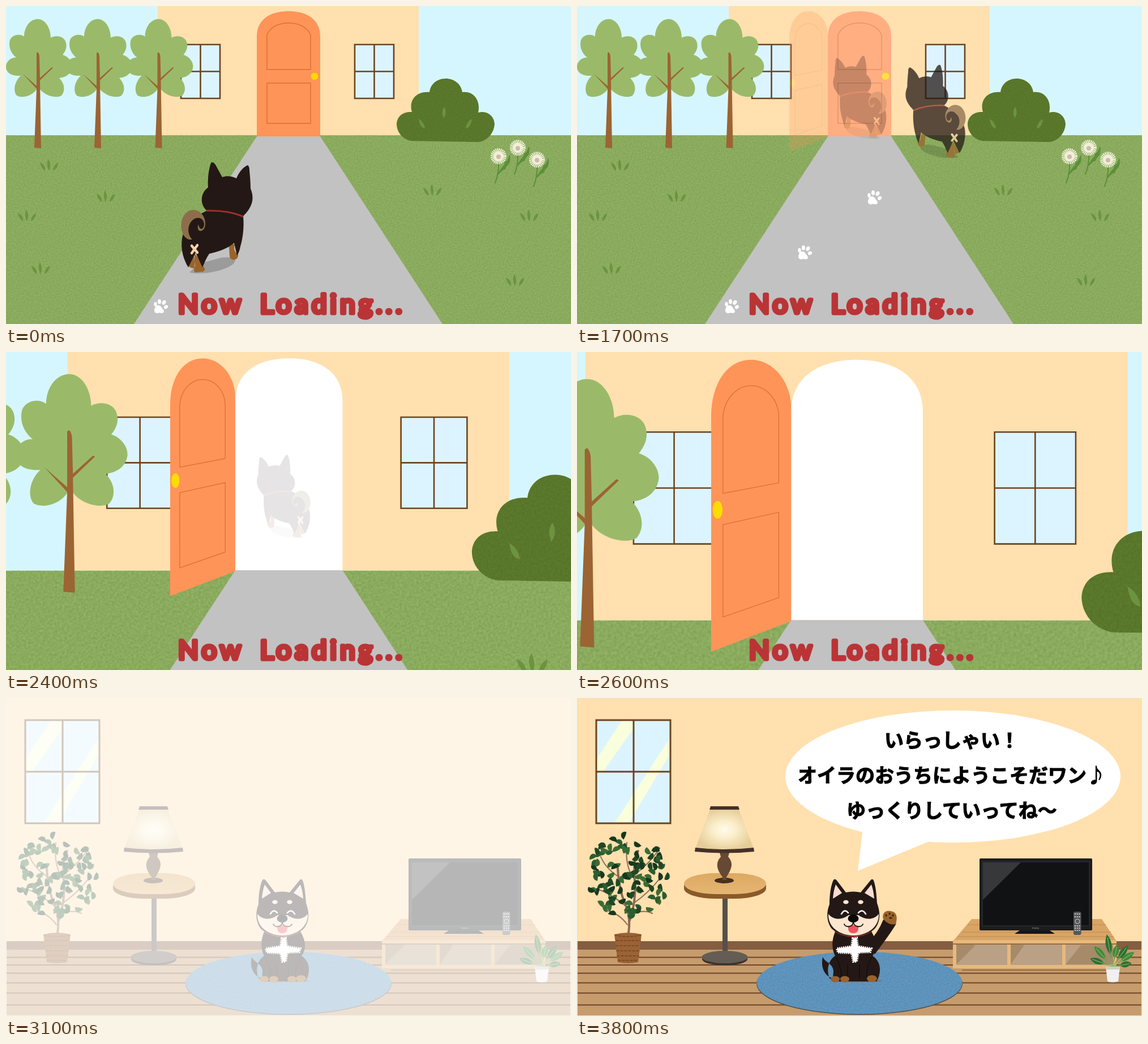
These frames come from a looping animation (998x561 px, 6.8 s). An HTML page:

```html
<!DOCTYPE html>
<html lang="ja">
<head>
<meta charset="utf-8">
<title>Now Loading</title>
<style>
html, body { margin: 0; width: 100%; height: 100%; overflow: hidden; background: #fff; }
svg { display: block; width: 100vw; height: 100vh; }
.loading { font: 400 47px Lato, sans-serif; letter-spacing: 6.3px; word-spacing: 10px;
  fill: #ba3436; stroke: #ba3436; stroke-width: 7; stroke-linejoin: round; }
.speech { font: 900 34px "Noto Sans CJK JP", "Noto Sans CJK", sans-serif; text-anchor: middle;
  stroke: #000; stroke-width: 1.2; stroke-linejoin: round; }
.line { fill: none; stroke-linecap: round; stroke-linejoin: round; }
.thin { vector-effect: non-scaling-stroke; }
</style>
</head>
<body>
<svg viewBox="0 0 998 561" preserveAspectRatio="none">
<defs>
  <filter id="grain" x="0" y="0" width="1" height="1" color-interpolation-filters="sRGB">
    <feTurbulence type="fractalNoise" baseFrequency=".4" numOctaves="2"/>
    <feColorMatrix values="0 0 0 0 .2  0 0 0 0 .25  0 0 0 0 .05  .3 0 0 0 -.08"/>
    <feComposite operator="atop" in2="SourceGraphic"/>
  </filter>
  <radialGradient id="glow"><stop stop-color="#fffbea"/><stop offset=".4" stop-color="#fbeecb"/><stop offset="1" stop-color="#e6cd97"/></radialGradient>
  <linearGradient id="wood" x2="0" y2="1"><stop stop-color="#dda963"/><stop offset="1" stop-color="#e5b673"/></linearGradient>

  <g id="tree">
    <path fill="#9aba6a" d="M32,54C32,38 42,23 56,23C70,23 79,40 79,56C88,51 101,53 105,62C109,72 105,80 100,86C110,89 117,98 117,107C116,119 106,126 94,127C104,137 105,150 98,158C88,164 65,158 57,142C50,158 30,164 19,158C12,150 15,133 26,123C12,124 0,119 0,107C0,97 10,90 18,91C8,83 4,71 7,60C12,49 26,49 32,54Z"/>
    <path fill="#9c6433" d="M54,83Q57,79 59,88L60,127L81,108L83,109L60,131L62,251L50,250L54,146L30,120L54,141Z"/>
  </g>
  <path id="pane" class="thin" fill="#dcf4ff" stroke="#6b4420" stroke-width="2.600" d="M1,1H70V96H1ZM35.500,1V96M1,48.500H70"/>
  <path id="tuft" fill="#6b9340" d="M0,10Q-6,-2-1,-11Q5,0 0,10M-7,10Q-15,4-16,-5Q-5,0-7,10M7,10Q7,0 16,-5Q16,5 7,10"/>
  <g id="flower">
    <path class="line" stroke="#5b9038" stroke-width="2" d="M0,10Q1,30-6,47"/>
    <path fill="#5b9038" d="M-4,36Q3,22 10,15L11,10L15,8L20,-3Q23,12 14,18L12,23L7,25Z"/>
    <circle r="9" fill="#ebe8cc"/>
    <circle r="8" fill="none" stroke="#f5f3e0" stroke-width="12" stroke-dasharray="1.3 .8"/>
    <circle r="4" cy="1" fill="#cdbba6"/>
  </g>
  <g id="paw" fill="#fff">
    <path d="M-4,-2C1,-2 2,3 5,6C8,11 3,13-2,11C-6,13-12,12-11,6C-10,1-8,-2-4,-2Z"/>
    <ellipse cx="-9" cy="-4" rx="2.700" ry="4"/>
    <ellipse cx="-2" cy="-8.500" rx="3" ry="4.300"/>
    <ellipse cx="6" cy="-7" rx="3.200" ry="4.300" transform="rotate(30 6 -7)"/>
    <ellipse cx="9.500" cy="1" rx="3" ry="3.800" transform="rotate(55 9.500 1)"/>
  </g>
  <path id="arch" d="M443,230V53C443,25 465,9 499,9C533,9 555,25 555,53V230Z"/>

  <g id="walker">
    <path fill="#000" opacity=".2" d="M324,470C345,475 385,468 400,456C412,446 400,441 380,444L340,455Z"/>
    <path fill="#9a6329" d="M331,434Q322,447 321,456Q325,464 333,462L333,437C342,445 345,456 350,461C353,466 350,469 344,469L334,470C331,467 332,463 334,459ZM393,420H404C402,428 403,434 410,438C411,443 408,447 402,448L397,446C393,440 396,432 393,422Z"/>
    <path fill="#231815" d="M357,320C356,303 358,288 362,277C364,274 368,277 370,280L382,302C390,299 399,300 407,304C412,292 419,285 426,281C429,281 430,285 430,290C431,300 432,312 432,322C437,334 437,346 430,357C426,364 422,367 419,371C421,390 418,412 414,424C413,430 411,436 408,440L403,418C390,429 373,434 359,437C354,444 351,452 347,461L335,435L322,461C314,448 308,430 311,410C315,390 330,372 355,361C343,352 342,331 357,320Z"/>
    <path class="line" stroke="#9c2f2c" stroke-width="3" d="M355,361Q392,360 418,371"/>
    <path fill="#8c6e4c" d="M323,412C305,405 305,372 322,362C339,354 353,370 352,385C352,392 348,397 343,397C338,396 338,389 340,385C341,396 350,396 350,384C348,371 335,372 329,378C321,386 319,401 329,412Z"/>
    <path class="line" stroke="#ffd2a4" stroke-width="4.500" d="M328,423L338,435M338,422L328,436"/>
  </g>
</defs>

<g id="outside">
  <g id="scene">
    <path fill="#d6f6ff" d="M0,0H998V229H0Z"/>
    <path fill="#ffe0ae" d="M268,0H729V228H268Z"/>
    <path fill="#91b364" filter="url(#grain)" d="M0,228H998V561H0Z"/>
    <use href="#pane" x="308" y="67"/><use href="#pane" x="615" y="67"/>
    <use href="#tree"/><use href="#tree" x="106"/><use href="#tree" x="213.500"/>
    <path fill="#5c7b2d" filter="url(#grain)" d="M716,238C700,235 690,222 690,208C691,193 703,186 717,187C711,167 724,150 748,152C750,136 763,128 777,128C791,128 804,137 806,152C826,149 839,167 834,188C850,184 862,194 863,208C862,226 848,239 834,240Z"/>
    <path fill="#6d9340" d="M773,198Q768,186 774,178Q780,188 773,198M729,199q10,6 11,17q-9,-1-11,-17M823,199q-10,6-11,17q9,-1 11,-17"/>
    <g id="tufts"></g>
    <use href="#flower" x="870" y="265"/><use href="#flower" x="904" y="250"/><use href="#flower" x="938" y="271"/>
    <g id="entrance">
      <path fill="#c2c2c2" d="M443,230H555L777.500,571H219.500Z"/>
      <use href="#arch" fill="#fff"/>
      <g id="shut">
        <use href="#arch" fill="#ff9459"/>
        <path fill="none" stroke="#d9722f" stroke-width="1.500" d="M461,112V51C466,38 480,30 499,30C518,30 533,38 538,51V112ZM461,136H538V207H461Z"/>
        <circle cx="545" cy="124" r="6.800" fill="#ffd60a" stroke="#e9a520" stroke-width=".8"/>
      </g>
      <g id="ajar">
        <path fill="#ff9459" d="M443,231V50C443,28 428,9 409,9C388,9 375,30 375,57V257Z"/>
        <path class="thin" fill="none" stroke="#d9722f" stroke-width="1.300" d="M385,122.500V58C386,42 397,31 409,31C421,31 432,42 432.500,57V113.500ZM385,149L432.500,138.500V211L385,227.500Z"/>
        <ellipse cx="380.500" cy="136.500" rx="4.200" ry="7.600" fill="#ffdc00"/>
      </g>
    </g>
    <g id="trail">
      <use href="#paw" x="273" y="530"/>
      <use id="paw1" href="#paw" x="402" y="435"/>
      <use id="paw2" href="#paw" x="525" y="338"/>
    </g>
  </g>
  <use id="dogA" href="#walker"/><use id="dogB" href="#walker"/>
  <text class="loading" x="304" y="541.500">Now Loading...</text>
  <rect id="edge" x=".5" y=".5" width="997" height="560" fill="none" stroke="#000"/>
</g>

<g id="room">
  <path fill="#ffe0ae" d="M0,0H998V430H0Z"/>
  <path fill="#855d40" d="M0,429H998V445H0Z"/>
  <path fill="#c69c6d" d="M0,444H998V561H0Z"/>
  <path stroke="#6f4526" stroke-width="1.800" d="M0,457.500H998M0,471H998M0,485.500H998M0,502.500H998M0,520.500H998M0,541.500H998"/>
  <rect x=".5" y=".5" width="997" height="560" fill="none" stroke="#f3e2d0"/>
  <path fill="#dcf4ff" d="M34,39H165V221H34Z"/>
  <path fill="#f9ffdc" d="M34,108L80,39H99V55L46,130H34ZM66,221L165,69V98L91,221Z"/>
  <path fill="none" stroke="#6b4420" stroke-width="3" d="M34,39H165V221H34ZM100,39V221M34,130H165"/>

  <g class="line" stroke="#8d6a55" stroke-width="4">
    <path d="M90,420Q96,390 86,365Q74,340 72,300M92,395Q105,360 102,320T108,270"/>
    <path stroke-width="2" d="M89,400Q75,380 50,374M87,368Q60,345 38,338M100,362Q125,345 145,320M96,382Q118,372 133,380M102,320Q84,300 88,255M104,310Q130,290 146,265M73,315Q50,300 42,280"/>
  </g>
  <g id="leaves"></g>
  <path fill="#9a6236" d="M66,417Q90,411 114,417L108,466Q90,470 72,466Z"/>
  <path class="line" stroke="#75441f" stroke-width="1.500" stroke-dasharray="4 3" d="M67,418Q90,424 113,418M69,428H112M69,437H111M70,446H110M71,455H109M73,463H108"/>

  <path fill="#56504a" d="M257,350H266V455H257Z"/>
  <path fill="#3b342e" d="M221,456H301V461C298,475 224,475 221,461Z"/>
  <ellipse cx="261" cy="457" rx="40.500" ry="11" fill="#655d54"/>
  <rect x="189" y="314" width="145" height="40" rx="56" ry="18" fill="#895a2a"/>
  <rect x="189" y="309" width="145" height="37" rx="56" ry="18.500" fill="url(#wood)"/>
  <ellipse cx="260" cy="322" rx="17" ry="5" fill="#49301f"/>
  <path fill="#664833" d="M252,273H269L267,280C278,292 272,303 264,316V321H257V316C248,304 243,292 254,280Z"/>
  <path fill="url(#glow)" d="M236,195H285L313,268Q260,272 208,268Z"/>
  <path fill="#46302a" d="M236,191H285L287,197H234ZM209,264Q260,270 312,264L313,271Q260,276 208,271Z"/>

  <path fill="#d9a566" d="M697,390H927L953,429H664Z"/>
  <path stroke="#c18a4c" d="M690,400H934M680,413H943M672,421H948"/>
  <path fill="#baa085" d="M667,432H950V474H667Z"/>
  <path fill="#a68a6a" d="M670,432L704,436L670,470ZM766,432L790,436L766,470ZM863,470L890,436H950V470Z"/>
  <path fill="none" stroke="#e6ba7d" stroke-width="6" d="M664,430H953M667,430V476M763,430V474M860,430V474M950,430V474M664,474H953"/>
  <path stroke="#9c6b38" stroke-width="2" d="M680,480H945M664,434H953"/>
  <path fill="#15161a" d="M785,408H832L844,416H773Z"/>
  <rect x="711" y="283" width="199" height="127" rx="2" fill="#1c1d1d"/>
  <path fill="#111214" stroke="#343536" d="M716,289H905V402H716Z"/>
  <path fill="#37383a" d="M717,290H784L717,356Z"/>
  <text x="810" y="407" font-family="Arial, sans-serif" font-size="4" fill="#999" text-anchor="middle">display</text>
  <rect x="877" y="377" width="13.500" height="41" rx="3" fill="#55585a"/>
  <path stroke="#d3d3d3" stroke-width="2" stroke-dasharray="2 1.700" d="M879,381H890M879,386H890M879,402H890M879,406H890M879,410H890"/>
  <circle cx="884" cy="394" r="4" fill="none" stroke="#ccc"/>
  <g id="fronds"></g>
  <path fill="#f1f0ee" d="M934,474H959L956,500Q946,503 937,500Z"/>
  <path fill="#cfccc8" d="M934,474H959L958,479H935Z"/>

  <ellipse cx="499" cy="504" rx="182" ry="55" fill="#54504c"/>
  <ellipse cx="499" cy="502.500" rx="181.500" ry="55" fill="#6199c8" filter="url(#grain)"/>

  <ellipse cx="496" cy="499" rx="44" ry="3" fill="#6b7d8c"/>
  <g fill="#231815">
    <path id="arm" d="M514,432Q532,414 541,391L564,398Q552,418 526,452Z"/>
    <path d="M434,457C438,466 453,469 453,482L452,495C437,490 430,476 434,457ZM457,410C448,430 451,445 456,455C444,462 440,480 446,494L452,500H529C538,485 538,465 522,455C530,445 531,430 520,412Z"/>
  </g>
  <path class="line" stroke="#0e0806" d="M456,456Q466,468 467,492M478,470V495M499,470V495M522,456Q512,468 511,492"/>
  <g fill="#9a6329">
    <ellipse cx="456" cy="496" rx="8" ry="5.500"/><ellipse cx="473" cy="496" rx="8" ry="5.500"/>
    <ellipse id="restPaw" cx="505" cy="496" rx="8" ry="5.500"/><ellipse cx="521" cy="495" rx="9" ry="6"/>
    <g id="wavePaw">
      <path d="M541,390C538,380 545,374 554,376C564,377 567,385 563,399Q551,402 541,390Z"/>
      <path class="line" stroke="#3b2313" stroke-width="3" d="M546,383v1M552,380v1M558,383v1M553,388h2"/>
    </g>
  </g>
  <path fill="#fff" stroke="#fff" stroke-width="4" stroke-dasharray="2 1.500" d="M487,424L494,423L496,438L520,442L518,448L497,449L494,465L488,465L485,450L461,449L459,442L485,438Z"/>
  <path class="line" stroke="#b5302f" stroke-width="4" d="M457,411Q488,428 519,411"/>
  <path fill="#231815" d="M446,364C446,345 449,329 453,321Q456,318 459,322L475,343Q488,340 501,343L519,321Q522,318 524,322C528,333 529,348 530,362C537,380 535,397 526,407C508,424 468,424 450,407C441,396 440,378 446,364Z"/>
  <path fill="#fbdcd0" d="M452,354Q453,340 457,329L468,344ZM525,354Q524,340 520,329L508,344Z"/>
  <path fill="#fde6d0" d="M444,381C455,394 470,390 480,383H497C507,390 522,394 533,381C534,405 512,419 488,419C465,419 443,405 444,381Z"/>
  <ellipse cx="475" cy="360" rx="4.800" ry="3.500" fill="#fde6d0"/><ellipse cx="501" cy="360" rx="4.800" ry="3.500" fill="#fde6d0"/>
  <path class="line" stroke="#fff" stroke-width="2.500" d="M467,381Q473,371 479,379M497,379Q504,371 510,381"/>
  <path fill="#ee5560" d="M479,403Q488,399 497,403Q498,415 488,415Q478,415 479,403Z"/>
  <path class="line" stroke="#231815" stroke-width="2" d="M472,399Q474,404 481,403Q488,402 488,394Q489,403 496,403Q503,404 505,399"/>
  <ellipse cx="488" cy="389" rx="9.500" ry="7" fill="#0b0706"/>

  <g id="bubble">
    <ellipse cx="664" cy="138.500" rx="296" ry="116.500" fill="#fff"/>
    <path fill="#fff" d="M506,222L496,305L622,253Z"/>
    <g class="speech">
      <text x="662" y="87">いらっしゃい！</text>
      <text x="662" y="149">オイラのおうちにようこそだワン♪</text>
      <text x="662" y="211">ゆっくりしていってね〜</text>
    </g>
  </g>
</g>
</svg>
<script>
const $ = id => document.getElementById(id);
const LOOP = 6800;

// Value in force at time t: pick(t, initial, time, value, time, value, ...)
function pick(t, value, ...steps) {
  for (let i = 0; i < steps.length && t >= steps[i]; i += 2) value = steps[i + 1];
  return value;
}
function fade(id, opacity) {
  $(id).style.display = opacity > 0 ? "" : "none";
  $(id).setAttribute("opacity", opacity);
}
// Puts the walking dog with its top left corner at x, y
function place(id, [x, y, s, flip]) {
  const dx = flip ? x + 436 * s : x - 308 * s;
  $(id).setAttribute("transform", `translate(${dx} ${y - 276 * s}) scale(${flip ? -s : s} ${s})`);
}

let seed = 7;
const random = () => (seed = seed * 16807 % 2147483647) / 2147483647;

$("tufts").innerHTML = [[76, 281], [176, 336], [37, 370], [61, 463], [753, 325], [924, 370], [899, 484]]
  .map(([x, y]) => `<use href="#tuft" x="${x}" y="${y}"/>`).join("");

const greens = ["#1f4726", "#2c5c30", "#3b6b35", "#17381f"];
$("leaves").innerHTML = Array.from({ length: 110 }, (_, i) => {
  const a = random() * 2 * Math.PI, r = Math.sqrt(random());
  const x = 89 + 72 * r * Math.cos(a), y = 314 + 73 * r * Math.sin(a);
  return `<path fill="${greens[i % 4]}" d="M-7,0Q-4,-7 3,-6Q8,-3 7,2Q0,3-7,0Z" transform="translate(${x} ${y}) rotate(${random() * 360})"/>`;
}).join("");

$("fronds").innerHTML = [[-70, 42], [-42, 48], [-10, 58], [12, 40], [36, 46], [56, 46], [80, 34]]
  .map(([angle, n], i) => `<g transform="translate(946 474) rotate(${angle})">
    <path fill="${i % 2 ? "#3f8a3a" : "#2c6f31"}" d="M0,0L-1,${-n * .4}Q-10,${-n * .7} 0,${-n}Q10,${-n * .7} 1,${-n * .4}Z"/>
    <path stroke="#8fbd67" d="M0,0V${-n * .9}"/></g>`).join("");

function render(t) {
  fade("outside", pick(t, 1, 2800, .3, 3000, 0));
  fade("room", pick(t, 0, 3000, .1, 3100, .3, 3300, 1));
  fade("edge", pick(t, 0, 2800, 1));

  const zoom = pick(t, 0, 2200, .25, 2400, .578, 2600, .9, 2800, 1);
  const pan = pick(t, 0, 2200, -149, 2400, -344.5, 2600, -542, 2800, -605);
  $("scene").setAttribute("transform", `translate(${pan} 0) scale(${1 + 1.197 * zoom})`);
  $("entrance").setAttribute("transform", `translate(0 ${-2.4 * Math.min(1, zoom * 2)})`);

  const open = t < 1700 ? 0 : Math.min(1, (Math.floor((t - 1700) / 100) + 1) / 4);
  fade("shut", 1 - open);
  fade("ajar", open);

  place("dogA", pick(t, [308, 276, 1], 500, [442, 191, .9, true], 1000, [566, 121, .8], 1500, [580, 104, .84, true]));
  fade("dogA", 1 - open);
  place("dogB", [452 - 16 * zoom, 88 + 162 * zoom, .75, true]);
  fade("dogB", open * pick(t, 1, 2200, .55, 2400, .11, 2600, 0));
  fade("paw1", pick(t, 0, 500, 1));
  fade("paw2", pick(t, 0, 1000, 1));
  fade("trail", pick(t, 1, 2200, .55, 2400, 0));

  const greeting = pick(t, 0, 3800, 1);
  for (const id of ["arm", "wavePaw", "bubble"]) fade(id, greeting);
  fade("restPaw", 1 - greeting);
}

let shown = -1;
function tick() {
  const step = Math.floor(performance.now() % LOOP / 100);
  if (step !== shown) render((shown = step) * 100);
  requestAnimationFrame(tick);
}
tick();
</script>
</body>
</html>
```
